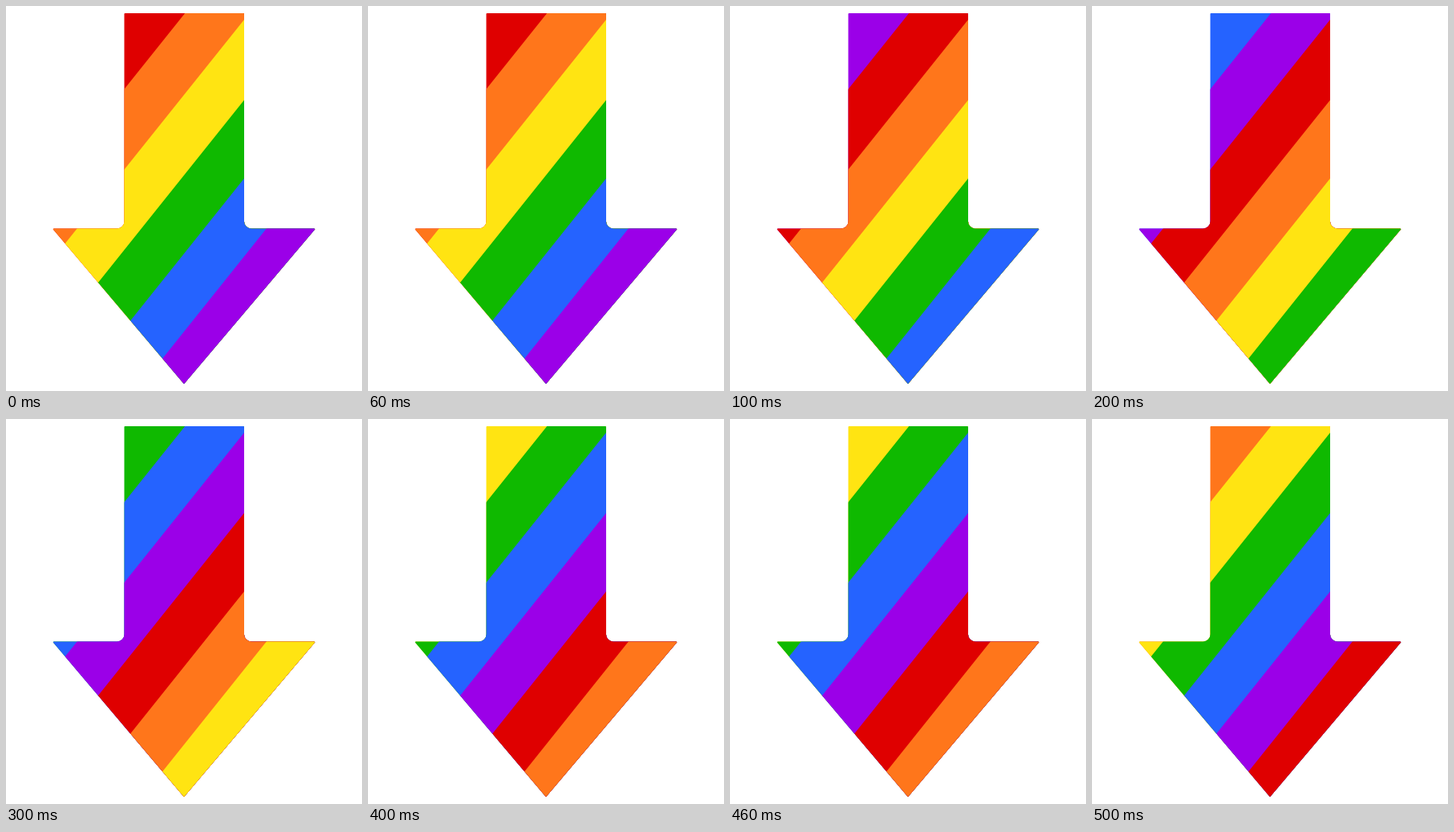
An HTML page with a canvas that plays this animation: 444 by 480 pixels, repeating every 0.6 s.

```html
<!DOCTYPE html>
<html lang="en">
<head>
<meta charset="utf-8">
<title>Rainbow arrow</title>
<style>
  html, body { margin: 0; width: 100%; height: 100%; overflow: hidden; background: #fff; }
  canvas { display: block; }
</style>
</head>
<body>
<canvas id="stage" width="444" height="480"></canvas>
<script>
const ctx = document.getElementById('stage').getContext('2d');
const COLORS = ['#df0000', '#ff761b', '#ffe412', '#0fb900', '#2563ff', '#9b00e8'];
const STEP = 100;
const SLOPE = 1.25;
// Heights at which the upper edge of each stripe meets x = 0
const EDGES = [0, 288, 388.3, 488.5, 586.3, 683.5];

// Corners of the arrow: x, y, radius
const CORNERS = [
  [297, 9, 1], [297, 277.5, 9], [386, 277.5, 0.7], [222, 471.3, 0.5],
  [58, 277.5, 0.7], [147.5, 277.5, 9], [147.5, 9, 1]
];

function makeArrow() {
  const path = new Path2D();
  path.moveTo(222, 9);
  CORNERS.forEach(([x, y, r], i) => {
    const [nx, ny] = CORNERS[i + 1] || [222, 9];
    path.arcTo(x, y, nx, ny, r);
  });
  path.closePath();
  return path;
}

const arrow = makeArrow();

function fillBelow(edge, color) {
  ctx.fillStyle = color;
  ctx.beginPath();
  ctx.moveTo(0, edge);
  ctx.lineTo(444, edge - 444 * SLOPE);
  ctx.lineTo(444, 1100);
  ctx.lineTo(0, 1100);
  ctx.fill();
}

function draw(time) {
  const n = COLORS.length;
  const shift = Math.floor(time / STEP) % n;
  ctx.fillStyle = '#fff';
  ctx.fillRect(0, 0, 444, 480);
  ctx.save();
  ctx.clip(arrow);
  EDGES.forEach((edge, i) => fillBelow(edge, COLORS[(i - shift + n) % n]));
  ctx.restore();
}

const start = performance.now();
function tick() {
  draw(performance.now() - start);
  requestAnimationFrame(tick);
}
tick();
</script>
</body>
</html>
```
